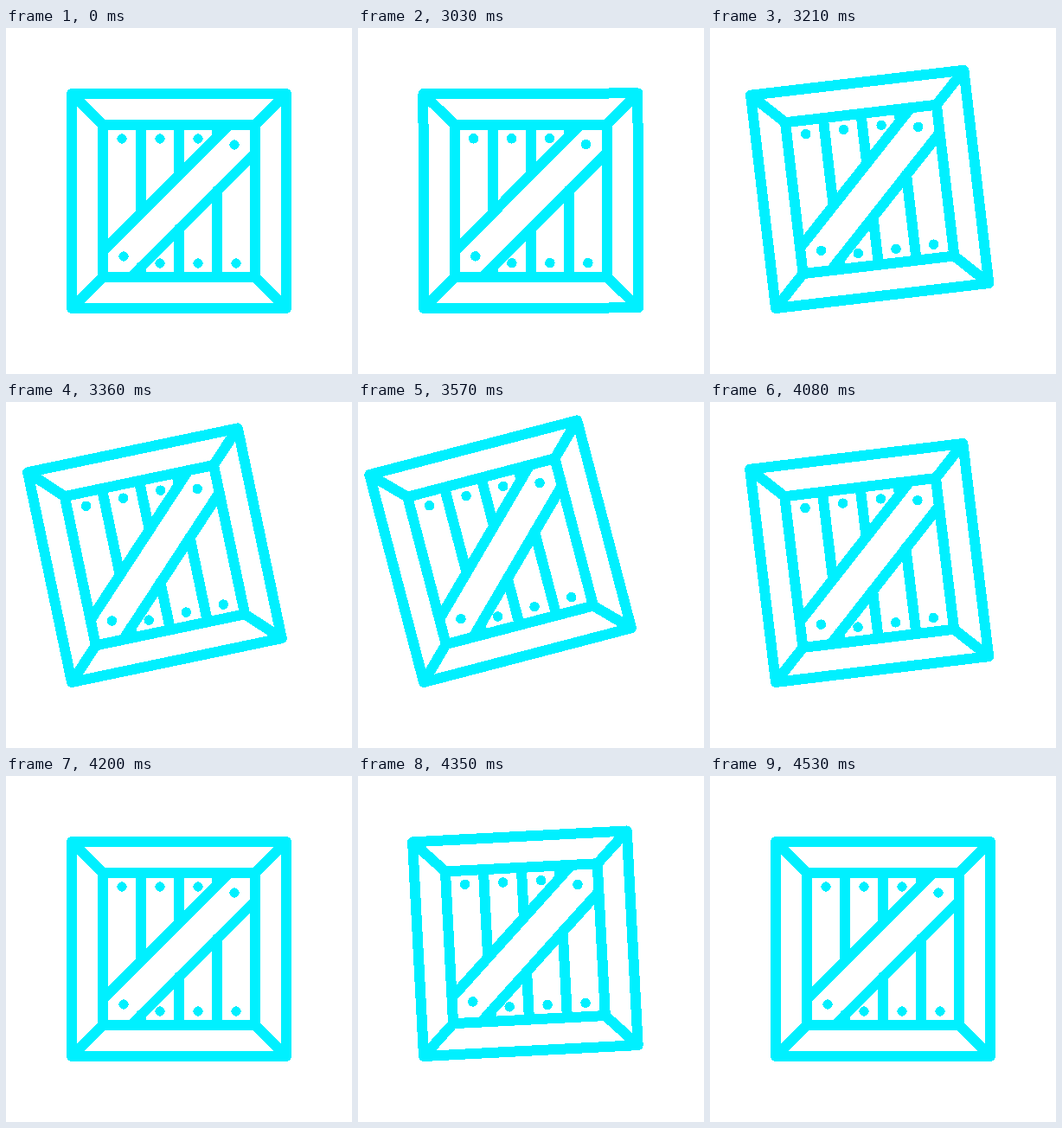
An HTML page for the animation above (4.56 s loop, 400 by 400 pixels).

```html
<!DOCTYPE html>
<html lang="en">
<head>
<meta charset="utf-8">
<title>Tipping crate</title>
<style>
  html, body { margin: 0; width: 100%; height: 100%; overflow: hidden; background: #fff; }
  svg { display: block; width: 100%; height: 100%; }
  path { fill: none; stroke: #00f0ff; stroke-width: 12; stroke-linecap: round; stroke-linejoin: round; }
  .nails { stroke-width: 11.5; }
</style>
</head>
<body>
<svg viewBox="0 0 400 400" shape-rendering="crispEdges">
  <g id="crate">
    <path d="M76 76H324V324H76Z M112 112H288V288H112Z
      M76 76L112 112 M324 76L288 112 M76 324L112 288 M324 324L288 288
      M112 258L258 112 M144.5 288L288 144.5
      M156 112V210 M200 112V166 M244 112V122
      M156 276V288 M200 232V288 M244 188V288"/>
    <path class="nails" d="M134 128h0 M178 128h0 M222 128h0 M264 135h0
      M136 264h0 M178 272h0 M222 272h0 M266 272h0"/>
  </g>
</svg>
<script>
const LOOP = 4560, STEP = 30;
const LIFT = 3000, PEAK = 3700, LAND = 4200, REST = 4530;
const TILT = 15, BOUNCE = 3;
const crate = document.getElementById('crate');

// Cubic Bezier easing with control points (x1, 0) and (x2, 1)
function ease(x, x1, x2) {
  let lo = 0, hi = 1, u = 0.5;
  for (let i = 0; i < 24; i++) {
    u = (lo + hi) / 2;
    const v = 1 - u;
    if (3 * x1 * u * v * v + 3 * x2 * u * u * v + u ** 3 < x) lo = u;
    else hi = u;
  }
  return u * u * (3 - 2 * u);
}

function tiltAt(t) {
  const part = (from, to) => (t - from) / (to - from);
  if (t <= LIFT || t >= REST) return 0;
  if (t < PEAK) return TILT * ease(part(LIFT, PEAK), 0.275, 0.26);
  if (t < LAND) return TILT * (1 - part(PEAK, LAND) ** 2.25);
  const p = part(LAND, REST);
  return BOUNCE * 4 * p * (1 - p);
}

function draw() {
  const t = Math.floor((performance.now() % LOOP) / STEP) * STEP;
  crate.setAttribute('transform', `rotate(${-tiltAt(t)} 76 324)`);
  requestAnimationFrame(draw);
}
draw();
</script>
</body>
</html>
```
